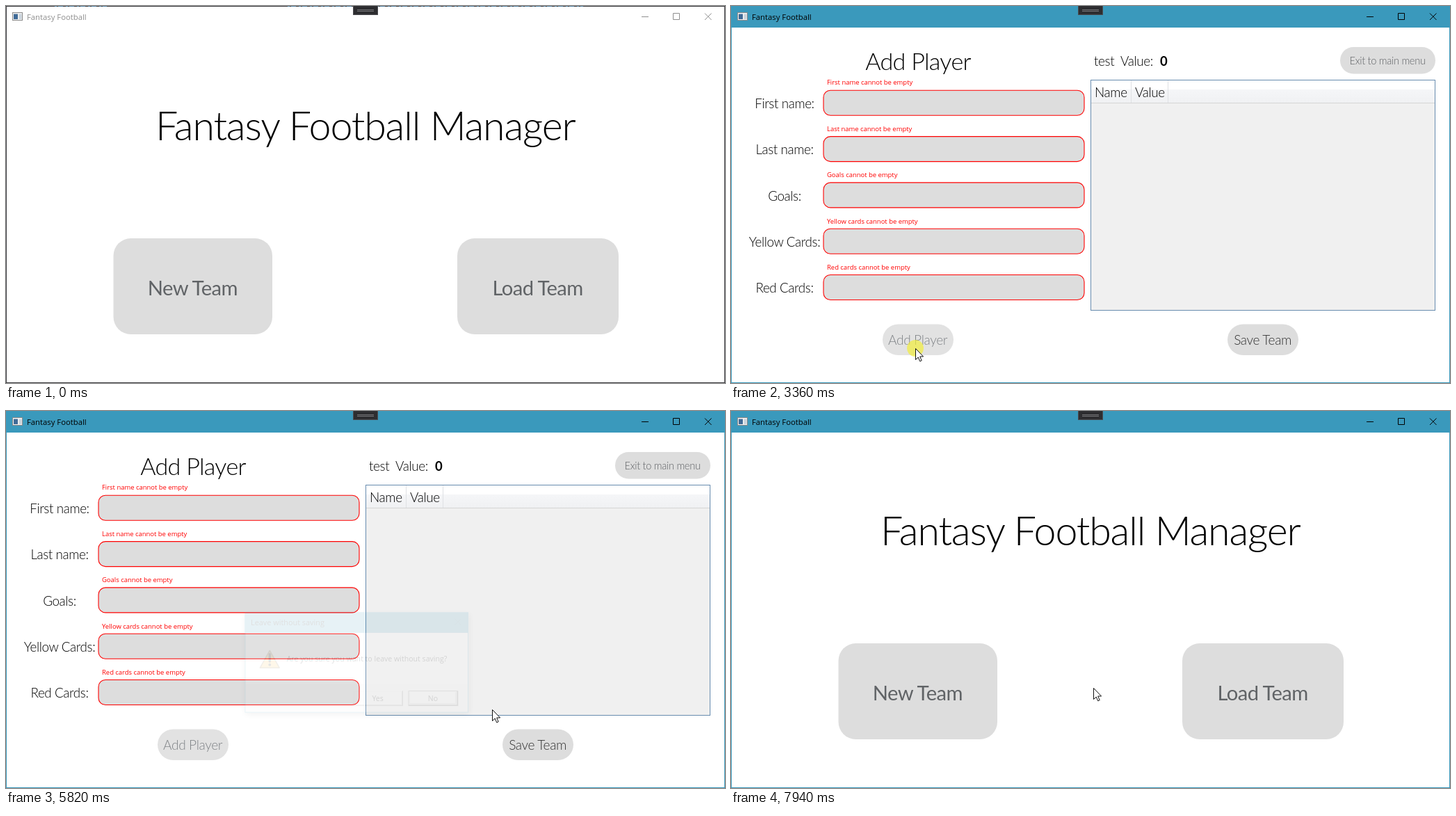
Write an HTML page that moves like this. It is 1034 px wide and 542 px high and loops after 7990 ms.

```html
<!DOCTYPE html>
<html lang="en">
<head>
<meta charset="utf-8">
<title>Fantasy Football</title>
<style>
html, body { margin: 0; width: 100%; height: 100%; overflow: hidden; background: #fff; }
svg { display: block; width: 1034px; height: 542px; }
text { font-family: Lato, "Open Sans", sans-serif; letter-spacing: -.02em; white-space: pre; }
.light { font-weight: 300; }
.mid { text-anchor: middle; }
.ui { font-family: "Open Sans", "Noto Sans", sans-serif; letter-spacing: 0; }
</style>
</head>
<body>
<svg id="stage" viewBox="0 0 1034 542"></svg>
<script>
const LOOP = 7990;
const TEAL = '#3a99bc', GREY = '#dddddd', HOVER = '#c4e5f6';

const rect = (x, y, w, h, fill, more = '') =>
  `<rect x="${x}" y="${y}" width="${w}" height="${h}" fill="${fill}" ${more}/>`;
const text = (x, y, size, str, cls = 'light', fill = '#000', more = '') =>
  `<text x="${x}" y="${y}" font-size="${size}" class="${cls}" fill="${fill}" ${more}>${str}</text>`;
const path = (d, stroke, fill = 'none', more = '') =>
  `<path d="${d}" stroke="${stroke}" fill="${fill}" ${more}/>`;

// Rounded buttons, with the page they belong to
const buttons = [
  { page: 'menu', x: 154.5, y: 334, w: 228.5, h: 138, r: 25, size: 29.2, base: 415.5, label: 'New Team' },
  { page: 'menu', x: 649, y: 334, w: 232, h: 138, r: 25, size: 29.2, base: 415.5, label: 'Load Team' },
  { page: 'name', x: 426, y: 409, w: 182, h: 67, r: 25, size: 28.8, base: 454, label: 'Create Team' },
  { page: 'squad', x: 876, y: 59, w: 137, h: 38.5, r: 19.2, size: 14.6, base: 84, label: 'Exit to main menu', light: 1 },
  { page: 'squad', x: 714, y: 457.5, w: 102, h: 44.5, r: 22.2, size: 19.1, base: 487, label: 'Save Team', light: 1, ink: '#333' },
  { page: 'squad', x: 218, y: 457.5, w: 102, h: 44.5, r: 22.2, size: 19.1, base: 487, label: 'Add Player', light: 1, ink: '#808488', off: 1 },
];
const labels = ['First name', 'Last name', 'Goals', 'Yellow Cards', 'Red Cards'];
const fields = [{ page: 'name', x: 367, y: 265, w: 300, h: 41 }].concat(
  labels.map((_, i) => ({ page: 'squad', x: 133, y: 121.3 + 66.3 * i, w: 375, h: 36 })));

const drawButton = (b, i) =>
  rect(b.x, b.y, b.w, b.h, b.off ? '#e2e2e2' : GREY, `rx="${b.r}" id="b${i}"`) +
  text(b.x + b.w / 2 - .4, b.base, b.size, b.label, b.light ? 'light mid' : 'mid', b.ink || '#606366');
const drawPage = (name, body) =>
  `<g id="${name}">${body}${buttons.map((b, i) => b.page === name ? drawButton(b, i) : '').join('')}</g>`;

const menu = drawPage('menu', text(516.8, 193, 57.3, 'Fantasy Football Manager', 'light mid'));

const nameForm = drawPage('name',
  text(516, 154, 57.3, 'Team Name', 'light mid') +
  rect(367, 265, 300, 41, GREY, 'rx="10"') +
  text(374, 295.5, 23, '', '', '#000', 'id="typed"'));

const formRows = labels.map((label, i) => {
  const f = fields[i + 1];
  const hint = label[0] + label.slice(1).toLowerCase() + ' cannot be empty';
  return text(77, 147 + 66.3 * i, 18.8, label + ':', 'light mid') +
    text(138, 113 + 66.6 * i, 9.45, hint, 'ui', '#f00') +
    rect(f.x, f.y, f.w, f.h, GREY, 'rx="10" stroke="#f00" stroke-width="1.1"');
}).join('');

const table =
  rect(517.5, 106.5, 495, 331, '#f0f0f0', 'stroke="#688caf"') +
  rect(518, 107, 494, 32, 'url(#head)') +
  path('M518 139.5H1012', '#d5d5d5') + path('M575.5 107V139M628.5 107V139', '#dfe1e4') +
  text(523, 131, 18.9, 'Name') + text(581, 131, 18.9, 'Value');

const squad = drawPage('squad',
  text(269, 92, 34.1, 'Add Player', 'light mid') + formRows +
  text(522, 86, 18.9, 'test') + text(560, 86, 18.9, 'Value:') +
  text(617, 86, 18.5, '0', '', '#000', 'font-weight="700"') + table);

const classicButton = (x, label, main) =>
  rect(x, 404, 75, 23, main ? '#555' : '#707070') +
  rect(x + main, 404 + main, 74 - main * 2, 22 - main * 2, '#fff') +
  rect(x + 1 + main, 405 + main, 73 - main * 3, 21 - main * 3, '#a0a0a0') +
  rect(x + 1 + main, 405 + main, 72 - main * 3, 20 - main * 3, '#f0f0f0') +
  text(x + 37, 419.5, 11, label, 'ui mid');

const dialog = `<g id="dialog">
  ${rect(336, 286, 336.5, 151, '#fff', 'filter="url(#shadow)"')}
  ${rect(336, 286, 336.5, 31, TEAL)}
  ${rect(337, 394, 335, 43, '#f0f0f0')}
  ${rect(336.5, 286.5, 335.5, 150, 'none', `stroke="${TEAL}"`)}
  ${text(345, 305.5, 11.4, 'Leave without saving', 'ui')}
  ${path('M652 296l9 9m0-9l-9 9', '#2c7c9b')}
  ${path('M373.5 343.5L388 369.5H359Z', '#8d7a4a', '#f8c14c', 'stroke-width="1.6" stroke-linejoin="round"')}
  ${path('M373.5 349V360', '#222', 'none', 'stroke-width="3.4" stroke-linecap="round"')}
  <circle cx="373.5" cy="365" r="2" fill="#222"/>
  ${text(399, 360, 11.1, 'Are you sure you want to leave without saving?', 'ui')}
  ${classicButton(499, 'Yes', 0)}${classicButton(582, 'No', 1)}
</g>`;

const chrome =
  rect(0, 0, 1034, 31, '#fff', 'id="bar"') +
  rect(.5, .5, 1033, 541, 'none', 'id="edge"') +
  path('M70 .5H145M405 .5H830', '#4f7f9f', 'none', 'id="behind" stroke-dasharray="3 2 7 4"') +
  rect(9.5, 9.5, 14, 11, '#f4f4f4', 'stroke="#888"') + rect(11, 11.5, 6, 7.5, '#3f6a96') +
  rect(18.5, 11.5, 4, 7.5, '#c9d3dc') +
  text(30, 20, 11.3, 'Fantasy Football', 'ui', '#000', 'id="caption"') +
  path('M914 15.5h10M959.5 10.5h9v9h-9zM1005 10.5l9.5 9.5m0-9.5l-9.5 9.5', '#000', 'none', 'id="controls"') +
  rect(499.5, -.5, 35, 13, '#2d2d30', 'stroke="#4c4c50"') + path('M505 5.5h24M505 7.5h24', '#77777a');

const pointer =
  `<g id="pointer"><circle r="12" fill="#f2ee3c" opacity=".7" id="glow"/>` +
  path('M.5 .5V16.5L4.2 13L6.7 18.8L9.2 17.7L6.7 12H11.6Z', '#111', '#fff', 'id="arrow"') +
  path('M-3 -7.5H-1L0 -6.5L1 -7.5H3M0 -6.5V6.5M-3 7.5H-1L0 6.5L1 7.5H3', '#111', 'none', 'id="beam"') + '</g>';

const stage = document.getElementById('stage');
stage.innerHTML = `<defs>
  <linearGradient id="head" x2="0" y2="1"><stop offset=".4" stop-color="#fff"/>
    <stop offset=".42" stop-color="#f5f6f8"/><stop offset="1" stop-color="#f0f1f3"/></linearGradient>
  <filter id="shadow" x="-10%" y="-20%" width="120%" height="140%">
    <feDropShadow dx="1" dy="3" stdDeviation="5" flood-opacity=".4"/></filter></defs>` +
  rect(0, 0, 1034, 542, '#fff') + menu + nameForm + squad + chrome + dialog + pointer;

const el = id => document.getElementById(id);
const show = (id, on) => el(id).setAttribute('visibility', on ? 'inherit' : 'hidden');

// Pointer stops: time, x, y
const stops = [
  [180, 590, 525], [430, 300, 418], [620, 300, 418], [820, 430, 288], [1330, 430, 288],
  [1560, 547, 443], [1750, 547, 443], [1850, 572, 428], [2510, 280, 150],
  [2660, 280, 150], [2960, 258, 506], [3080, 265, 492], [3400, 265, 492],
  [3780, 940, 85], [3880, 940, 85], [4200, 765, 500], [4340, 765, 492], [4680, 944, 83],
  [4950, 944, 83], [5480, 620, 415], [5670, 620, 415], [5800, 699, 429], [5850, 699, 429],
  [6270, 944, 83], [6500, 944, 83], [7110, 512, 428], [7150, 512, 428], [7340, 518, 413],
  [7570, 518, 413], [7760, 550, 407], [7860, 550, 407], [7940, 521, 398], [LOOP, 521, 398],
];
const clicks = [500, 830, 1600, 3220, 4770, 5580, 6340, 7480];
const keys = [960, 1050, 1140, 1230];
const inactive = [[0, 520], [4815, 5700], [6435, 7550]];
const dialogs = [[4815, 5715], [6435, 7545]];

const clamp = v => Math.max(0, Math.min(1, v));
const within = (t, spans) => spans.some(([a, b]) => t >= a && t < b);
const over = (o, x, y) => x >= o.x && x <= o.x + o.w && y >= o.y && y <= o.y + o.h;

function pointerAt(t) {
  const i = stops.findIndex(s => s[0] > t);
  if (i < 1) return [stops[0][1], stops[0][2]];
  const [t0, x0, y0] = stops[i - 1], [t1, x1, y1] = stops[i];
  const p = (t - t0) / (t1 - t0), e = p * p * (3 - 2 * p);
  return [x0 + (x1 - x0) * e, y0 + (y1 - y0) * e];
}

function dialogLevel(t) {
  const span = dialogs.find(([a, b]) => t >= a && t < b + 120);
  if (!span) return 0;
  const open = 1 - (1 - clamp((t - span[0]) / 145)) ** 2;
  return open * (1 - clamp((t - span[1]) / 120));
}

function render(t) {
  const page = t < 620 || t >= 7640 ? 'menu' : t < 1750 ? 'name' : 'squad';
  for (const name of ['menu', 'name', 'squad']) show(name, name === page);
  el('typed').textContent = 'test'.slice(0, keys.filter(k => t >= k).length);

  const idle = within(t, inactive), ink = idle ? '#8f8f8f' : '#000';
  el('bar').setAttribute('fill', idle ? '#fff' : TEAL);
  el('edge').setAttribute('stroke', idle ? '#3b3b3f' : TEAL);
  el('caption').setAttribute('fill', ink);
  el('controls').setAttribute('stroke', ink);
  show('behind', idle);

  const level = dialogLevel(t), k = .95 + .05 * level;
  el('dialog').setAttribute('opacity', level);
  el('dialog').setAttribute('transform', `translate(504 361.5) scale(${k}) translate(-504 -361.5)`);

  const [x, y] = pointerAt(t), free = !within(t, dialogs);
  buttons.forEach((b, i) => {
    if (b.off) return;
    const lit = t >= 180 && free && b.page === page && over(b, x, y);
    el('b' + i).setAttribute('fill', lit ? HOVER : GREY);
  });
  const beam = free && fields.some(f => f.page === page && over(f, x, y));
  show('pointer', t >= 180 && !(t >= keys[0] && t < 1330));
  show('arrow', !beam);
  show('beam', beam);
  const glow = clicks.some(c => t >= c && t < c + (c === 3220 ? 180 : 90));
  show('glow', glow);
  el('pointer').setAttribute('transform', `translate(${x.toFixed(1)} ${y.toFixed(1)})`);
}

const start = performance.now();
function tick() {
  render((performance.now() - start) % LOOP);
  requestAnimationFrame(tick);
}
tick();
</script>
</body>
</html>
```
